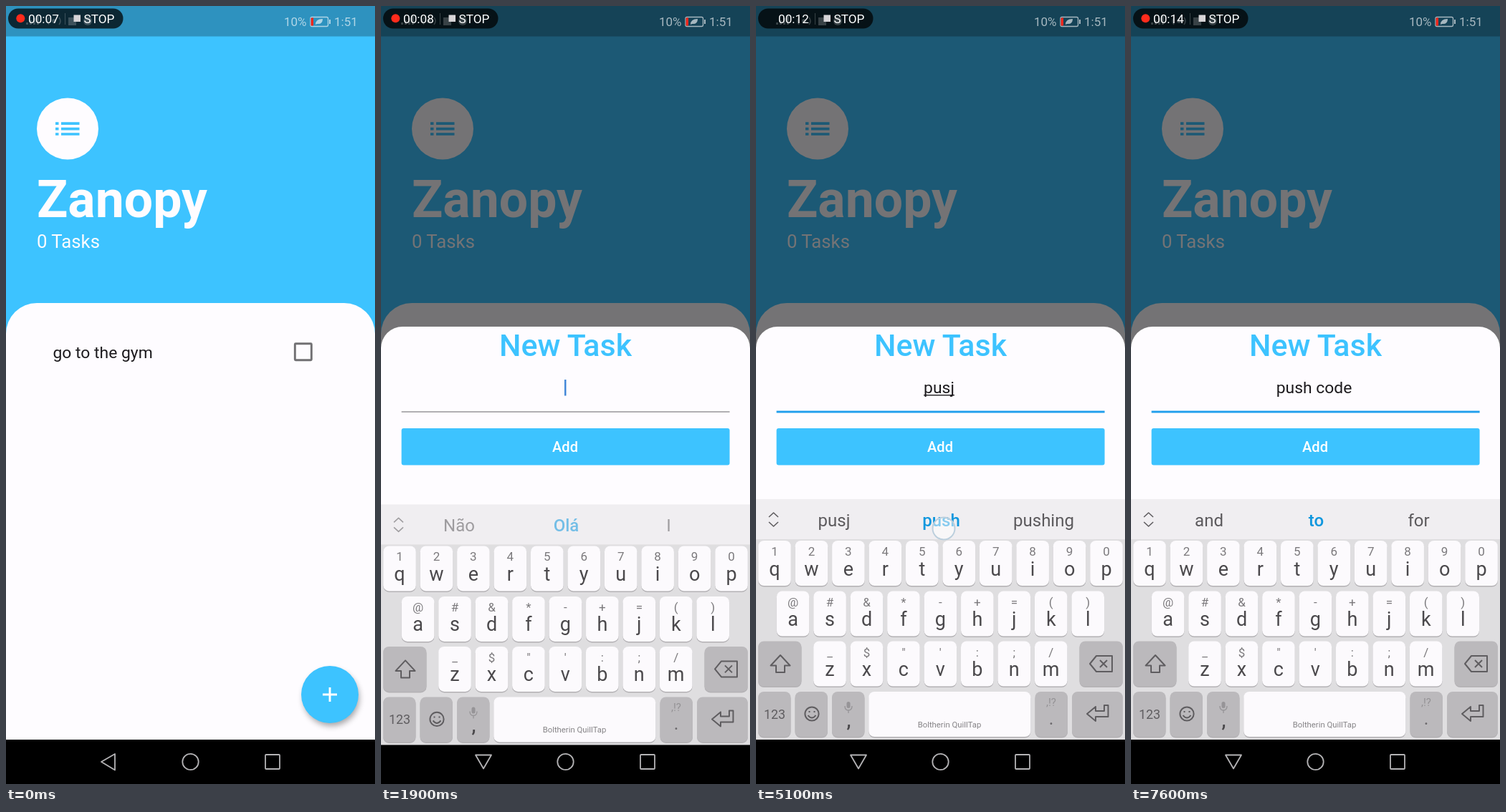
An HTML page for the animation above (8 s loop, 515 by 1087 pixels).

```html
<!DOCTYPE html>
<html lang="en">
<head>
<meta charset="utf-8">
<title>To-do app</title>
<style>
  html, body { margin: 0; width: 100%; height: 100%; overflow: hidden; background: #000; }
  svg { display: block; width: 100vw; height: 100vh; font-family: Roboto, sans-serif; }
  .mid { text-anchor: middle; }
  .line { fill: none; stroke: #5f5d60; stroke-width: 2; stroke-linejoin: round; }
</style>
</head>
<body>
<svg viewBox="0 0 515 1087">
  <defs>
    <filter id="soft" x="-30%" y="-30%" width="160%" height="160%"><feGaussianBlur stdDeviation="4"/></filter>
    <filter id="lift" x="-30%" y="-20%" width="160%" height="140%"><feGaussianBlur stdDeviation="2"/></filter>
  </defs>

  <!-- task list page -->
  <rect width="515" height="1087" fill="#3dc3ff"/>
  <rect width="515" height="42.5" fill="#000" opacity=".25"/>
  <circle cx="86" cy="171.5" r="43" fill="#fefcff"/>
  <path d="M69 164.2h4.5m3.5 0h25.5M69 171.6h4.5m3.5 0h25.5M69 179h4.5m3.5 0h25.5" stroke="#3dc3ff" stroke-width="3.7"/>
  <g fill="#fefcff">
    <text x="43" y="295" font-size="71.5" font-weight="700">Zanopy</text>
    <text x="43" y="337.5" font-size="25.75">0 Tasks</text>
    <path d="M0 1025V458a43 43 0 0 1 43-43h429a43 43 0 0 1 43 43v567z"/>
  </g>
  <text x="65.5" y="491.5" font-size="22.9" fill="#1d1b1e">go to the gym</text>
  <rect x="403.3" y="471.8" width="23" height="23" rx="1" fill="none" stroke="#717073" stroke-width="2.9"/>
  <circle cx="454" cy="967" r="39" opacity=".35" filter="url(#soft)"/>
  <circle cx="452" cy="962" r="40" fill="#3dc3ff"/>
  <path d="M442 962h20m-10-10v20" stroke="#fff" stroke-width="2.9"/>
  <rect id="navBack" y="1025" width="515" height="62"/>

  <!-- new task sheet -->
  <g id="modal">
    <rect width="515" height="1025" opacity=".54"/>
    <path d="M0 1087V478a30 30 0 0 1 30-30h455a30 30 0 0 1 30 30v609z" fill="#fefcff"/>
    <text class="mid" x="257.5" y="489" font-size="42.9" font-weight="500" fill="#3dc3ff">New Task</text>
    <text id="field" y="541" font-size="22.9" fill="#1d1b1e"></text>
    <rect id="compose" y="543" height="1.4" fill="#1d1b1e"/>
    <rect id="cursor" y="522" width="2.5" height="22.5" fill="#4488d8"/>
    <rect id="rule" x="28.6" width="458" />
    <rect x="28.6" y="590" width="458" height="51.5" rx="3" fill="#3dc3ff"/>
    <text class="mid" x="257" y="623" font-size="20" font-weight="500" fill="#fff">Add</text>
  </g>

  <g id="board">
    <rect y="689" width="515" height="57" fill="#f0eef1"/>
    <rect y="745" width="515" height="280" fill="#dfdee0"/>
    <rect y="1025" width="515" height="62"/>
    <g id="hints" font-size="24" class="mid">
      <path class="line" stroke-width="1.6" d="M18 714l6.5-6 6.5 6M18 721l6.5 6 6.5-6" style="stroke-width:1.6"/>
      <text x="109" y="726.5" fill="#5c5a5d"></text>
      <text x="258.5" y="726.5" fill="#0f97de" font-weight="500"></text>
      <text x="401.5" y="726.5" fill="#5c5a5d"></text>
    </g>
    <g id="keys" class="mid"></g>
  </g>

  <g id="popup">
    <rect x="-27" y="2" width="54" height="130" rx="9" opacity=".45" filter="url(#lift)"/>
    <rect x="-27" width="54" height="130" rx="9" fill="#fdfbfe"/>
    <text class="mid" y="48" font-size="37" fill="#0f97de"></text>
  </g>
  <g id="touches"></g>

  <!-- system bars -->
  <g fill="none" stroke="#b4b3b5" stroke-width="1.8">
    <path id="back" stroke-linejoin="round"/>
    <circle cx="257.5" cy="1056" r="11.2"/>
    <rect x="362" y="1046" width="20" height="20" rx="1"/>
  </g>
  <g fill="#fff" opacity=".62" font-size="17">
    <text x="388" y="28">10%</text>
    <text x="458" y="28">1:51</text>
    <rect x="425" y="15.5" width="24.5" height="13" rx="2" fill="none" stroke="#fff" stroke-width="1.3"/>
    <rect x="451" y="19" width="2" height="6"/>
    <path d="M432 26q0-8 10-8 0 8-8 7z"/>
  </g>
  <rect x="425.5" y="16.5" width="3.5" height="11" fill="#f2271c"/>
  <rect x="3" y="3.5" width="160.5" height="28" rx="14" opacity=".73"/>
  <g fill="#fff" opacity=".2">
    <path d="M28 26h3v-3h-3zM33 26h3v-6h-3zM38 26h3v-9h-3zM43 26h3V14h-3zM82 10h1v16h-1zM87 16h11v11H87z"/>
    <path d="M60 16q-4 5 0 10M74 16q4 5 0 10" fill="none" stroke="#fff" stroke-width="1.5"/>
    <circle cx="67" cy="21" r="3"/><circle cx="114" cy="21" r="6"/>
  </g>
  <circle id="dot" cx="20.3" cy="17.3" r="6" fill="#ff2b1c"/>
  <rect x="94.5" y="12.5" width="9.5" height="9.5" fill="#d6d4d7"/>
  <g fill="#fff" font-size="17.2"><text id="timer" x="31" y="24"></text><text x="108.5" y="24">STOP</text></g>
</svg>
<script>
const $ = id => document.getElementById(id);
const set = (el, attrs) => { for (const k in attrs) el.setAttribute(k, attrs[k]); };
const show = (el, on) => set(el, { visibility: on ? 'visible' : 'hidden' });
const clamp = v => Math.max(0, Math.min(1, v));

// Keyboard
const label = (s, x, y, size, fill, more = '') =>
  `<text x="${x}" y="${y}" font-size="${size}" fill="${fill}" ${more}>${s}</text>`;
const cap = (x, y, w, fill) =>
  `<rect x="${x}" y="${y + 1.5}" width="${w}" height="63" rx="8" fill="#b3b1b4"/>` +
  `<rect x="${x}" y="${y}" width="${w}" height="63" rx="8" fill="${fill}"/>`;
const LIGHT = '#fcfafd', DARK = '#bbb9bc', INK = '#4b494c';
const spot = {};
let html = '';
[['qwertyuiop', '1234567890', 26, 747],
 ['asdfghjkl', '@#&*-+=()', 51.6, 817.5],
 ['zxcvbnm', '_$"\':;/', 103, 887.5]].forEach(([letters, signs, x0, y]) => {
  [...letters].forEach((ch, i) => {
    const x = x0 + 51.45 * i;
    spot[ch] = [x, y];
    html += cap(x - 22.8, y, 45.6, LIGHT) +
      label(signs[i].replace('&', '&amp;'), x, y + 21, 17, '#7b797c') +
      label(ch, x, y + 48.5, 27, INK);
  });
});
html += cap(3, 887.5, 60.5, DARK) + cap(451.5, 887.5, 60.5, DARK);
[[3, 45.5], [54.5, 45.5], [106, 45.5], [389.5, 45.5], [441, 71]].forEach(([x, w]) => html += cap(x, 958, w, DARK));
html += cap(157.3, 958, 226, LIGHT) +
  label('123', 26, 995.5, 17.8, '#5f5d60') +
  label(',', 129.5, 1007, 27, INK, 'font-weight="500"') +
  label('.', 412, 1004, 25, '#6a686b') +
  label(',!?', 412, 978, 15, '#949295') +
  label('Boltherin QuillTap', 270, 1008, 11.3, '#858386') +
  `<g class="line">
    <path d="M34 907l13.5 14.5H40V931H28v-9.5h-7.500z"/>
    <path d="M466 919l9-11h22v22h-22zM480 914l10 10m0-10l-10 10"/>
    <path d="M462 989l12-10v6h12v-8h5.500v16H474v6z"/>
    <circle cx="78" cy="989" r="9.6"/><path d="M72.500 991q5.500 7 11 0M74.500 985v2m7-2v2"/>
  </g>
  <rect x="126.500" y="972" width="5" height="9" rx="2.500" fill="#969497"/>
  <path d="M124 978q0 6 5 6t5-6m-5 6v4" fill="none" stroke="#969497" stroke-width="1.300"/>`;
$('keys').innerHTML = html;

// Touches: press, release, x, y, key
const taps = [
  [300, 600, 464, 956],
  [3000, 3200, 486, 793, 'p'],
  [3300, 3500, 336, 790, 'u'],
  [3800, 4000, 106, 858, 's'],
  [4000, 4200, 360, 850, 'j'],
  [5000, 5200, 262, 730],
  [5800, 6000, 194, 926, 'c'],
  [6200, 6400, 438, 792, 'o'],
  [6500, 6700, 156, 858, 'd'],
  [6700, 6900, 130, 792, 'e'],
  [6900, 7100, 270, 1004]
];
$('touches').innerHTML = taps.map(([, , x, y]) =>
  `<circle cx="${x}" cy="${y}" r="15.500" fill="#fff" fill-opacity=".5" stroke="#bccfdd" stroke-width="2"/>`).join('');

// Field text and suggestions, each with its start time
const typed = [
  [1700, ''], [3200, 'p'], [3500, 'pu'], [4000, 'pus'], [4200, 'pusj'], [5300, 'push '],
  [6000, 'push c'], [6400, 'push co'], [6700, 'push cod'], [6900, 'push code'], [7100, 'push code ']
];
const words = [
  [0, 'Não Olá I'], [3200, 'put p people'], [3500, 'put pu push'], [4000, 'push pus pushing'],
  [4200, 'pusj push pushing'], [5300, 'it the for'], [6200, 'code c can'], [6400, 'come co could'],
  [6700, 'code cod coding'], [6900, 'codes code coding'], [7100, 'and to for']
];
const current = (list, t) => list.filter(e => e[0] <= t).pop() || list[0];

const pen = document.createElement('canvas').getContext('2d');
const width = s => { pen.font = '22.9px Roboto, sans-serif'; return pen.measureText(s).width; };

// Recording dot: dark for the first half of each second, with a few late steps
const dotOn = t => {
  const late = t < 2000 || t >= 7000 ? 100 : 0;
  return t < 100 || t % 1000 >= 500 + late;
};

function drawField(t) {
  const [since, text] = current(typed, t);
  const left = 255.5 - width(text.trim()) / 2;
  const start = text.lastIndexOf(' ') + 1;
  $('field').textContent = text.trim();
  set($('field'), { x: left });
  set($('compose'), { x: left + width(text.slice(0, start)), width: width(text.slice(start)) });
  set($('cursor'), { x: left + width(text) + 0.5, opacity: (t - since) % 1000 < 500 ? 1 : 0 });
  const focus = clamp((t - 1900) / 200);
  set($('rule'), { y: 567 - (0.7 + 0.75 * focus), height: 1.4 + 1.5 * focus, fill: focus ? '#1f9eec' : '#918f92' });
}

function drawBoard(t) {
  const drop = 398 * (1 - clamp((t - 1786) / 132)) ** 2;
  set($('board'), { transform: `translate(0 ${drop})` });
  show($('board'), t >= 1700);
  show($('navBack'), t < 1800);
  set($('hints'), { opacity: clamp(0.4 + (t - 1800) * 0.0015) });
  const list = current(words, t)[1].split(' ');
  $('hints').querySelectorAll('text').forEach((el, i) => el.textContent = list[i]);
  set($('back'), { d: t < 1700 ? 'M133 1056l19-11v22.500z' : 'M132 1046.500h22l-11 19z' });
}

function drawTouches(t) {
  taps.forEach(([from, to], i) =>
    set($('touches').children[i], { opacity: t < from ? 0 : clamp(1 - (t - to) / 200) }));
  const tap = taps.find(([from, to, , , key]) => key && t >= from && t < to);
  show($('popup'), tap);
  if (!tap) return;
  const [x, y] = spot[tap[4]];
  set($('popup'), { transform: `translate(${Math.max(31, Math.min(484, x))} ${y - 68})` });
  $('popup').lastElementChild.textContent = tap[4];
}

const begin = performance.now();
function frame() {
  const t = Math.floor((performance.now() - begin) % 8000 / 100) * 100;
  $('timer').textContent = '00:' + String(7 + Math.floor(t / 1000)).padStart(2, '0');
  show($('dot'), dotOn(t));
  show($('modal'), t >= 1900);
  drawField(t);
  drawBoard(t);
  drawTouches(t);
  requestAnimationFrame(frame);
}
frame();
</script>
</body>
</html>
```
